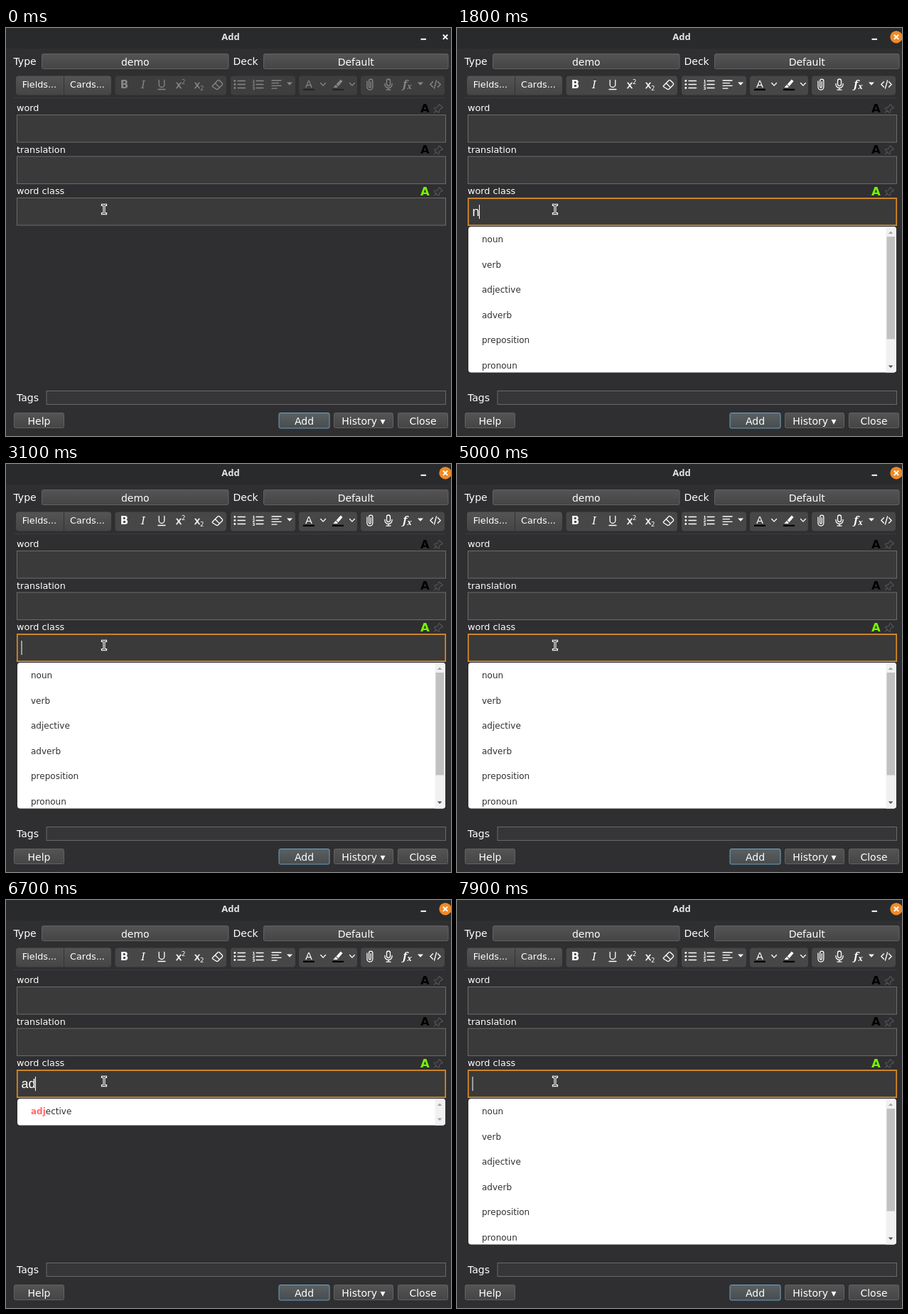
Write an HTML page that moves like this. It is 626x575 px and loops after 8000 ms.

```html
<!DOCTYPE html>
<html lang="en">
<head>
<meta charset="utf-8">
<title>Add</title>
<style>
  html, body { margin: 0; width: 100%; height: 100%; overflow: hidden; background: #2f2f31; }
  svg { display: block; width: 626px; height: 575px; font-family: "DejaVu Sans", sans-serif; }
  .ui { font-size: 14px; fill: #fff; }
  .label { font-size: 12.8px; fill: #fff; }
  .mid { text-anchor: middle; }
  .item { font-size: 12px; fill: #303030; }
  .hit { font-weight: bold; fill: #ff6b6b; }
  .typed { font: 18px "Liberation Sans", Arial, sans-serif; fill: #fff; }
  .badge { font: bold 16.5px "DejaVu Sans", sans-serif; text-anchor: middle; }
  .line { fill: none; stroke: #fff; stroke-width: 1.3; stroke-linecap: round; stroke-linejoin: round; }
  .solid { fill: #fff; }
</style>
</head>
<body>
<svg viewBox="0 0 626 575">
  <defs>
    <linearGradient id="btn" x2="0" y2="1">
      <stop stop-color="#545454"/><stop offset="1" stop-color="#454545"/>
    </linearGradient>
    <linearGradient id="blue" x2="0" y2="1">
      <stop stop-color="#5b6063"/><stop offset="1" stop-color="#474c4f"/>
    </linearGradient>
    <g id="pin" fill="none" stroke="#555557" stroke-width="1.1" stroke-linejoin="round">
      <path d="M609.5 -5.5l5 5-1.5.8-1-.2-2.6 2.6.2 2.6-1.2 1-6-6 1-1.2 2.6.2 2.6-2.6-.2-1zM605.2 3.3l-3.2 3.2"/>
    </g>
  </defs>

  <rect width="626" height="575" fill="#2f2f31"/>
  <rect width="626" height="29" fill="#292a2c"/>
  <text class="mid" x="316" y="17" font-family="Noto Sans, sans-serif" font-size="13" font-weight="700" fill="#e4e4e4">Add</text>
  <path d="M583.5 15.8h7.5" stroke="#fff" stroke-width="2"/>
  <circle id="close" cx="618" cy="12.7" r="8.7" fill="#ef8a26"/>
  <path d="M614.8 9.5l6.4 6.4m0-6.4l-6.4 6.4" stroke="#fff" stroke-width="1.9"/>

  <g id="form"></g>
  <path d="M11 98.5H618" stroke="#3c3c3e"/>

  <g id="chips"></g>
  <path d="M81.5 68v26" stroke="#343436"/>
  <text class="label mid" x="47" y="84">Fields...</text>
  <text class="label mid" x="114.5" y="84">Cards...</text>

  <g id="tools">
    <g class="solid mid">
      <text x="166.5" y="85" font-size="15" font-weight="700">B</text>
      <text x="193" y="85" font-family="DejaVu Serif, Noto Serif, serif" font-size="15" font-style="italic">I</text>
      <text x="243" y="85" font-size="14.5" stroke="#fff" stroke-width=".4">x</text>
      <text x="249.7" y="79" font-size="8.5">2</text>
      <text x="269" y="85" font-size="14.5" stroke="#fff" stroke-width=".4">x</text>
      <text x="275.7" y="88" font-size="8.5">2</text>
      <text x="426" y="83.5" font-size="14.5">A</text>
      <text x="564.5" y="84" font-family="Noto Serif, serif" font-size="15" font-style="italic" font-weight="700">f<tspan font-size="11" dy="2">x</tspan></text>
    </g>
    <g class="line">
      <path d="M215.2 73.5v6.2a3.8 3.8 0 0 0 7.6 0v-6.2M214 86.5h10"/>
      <path d="M290.5 81.5l7.3-7.5q1.3-1.2 2.6 0l3.7 3.7q1.2 1.3 0 2.6l-5.8 5.7q-1.4 1-2.8 0l-5-3.2q-.6-.6 0-1.3zM294.2 77.7l6.2 6.2"/>
      <path d="M326 74.5h10.5M326 79.5h10.5M326 84.5h10.5M352 74.5h10M352 79.5h10M352 84.5h10"/>
      <path d="M374 74h13M374 77.7h9.5M374 81.4h13M374 85.1h7"/>
      <path d="M442.7 77.5l3.4 3.6 3.4-3.6M483.5 77.5l3.4 3.6 3.4-3.6"/>
      <path d="M508 75v8.2a3.9 3.9 0 0 0 7.8 0v-8.5a2.6 2.6 0 0 0-5.2 0v8a1.3 1.3 0 0 0 2.6 0v-7"/>
      <rect x="535.5" y="72" width="5" height="9.5" rx="2.5"/>
      <path d="M533 78.5v1a5 5 0 0 0 10 0v-1M538 84.6v2.6m-3 0h6"/>
      <path d="M600.5 75.8l-3.7 3.7 3.7 3.7M607.5 75.8l3.7 3.7-3.7 3.7M605.6 73.8l-3.2 11.4"/>
    </g>
    <g class="solid">
      <circle cx="321.8" cy="74.5" r="1.4"/><circle cx="321.8" cy="79.5" r="1.4"/><circle cx="321.8" cy="84.5" r="1.4"/>
      <g font-size="5.6" font-weight="700"><text x="346.5" y="76.6">1</text><text x="346.5" y="81.6">2</text><text x="346.5" y="86.6">3</text></g>
      <path d="M395 76.5h8l-4 4.3zM579 76.5h8l-4 4.3z"/>
      <path d="M470.8 72.4l2.7 2.5-6 7.2-3-2.7zM463.8 80l3.2 2.9-1.6 1.1h-5z"/>
    </g>
    <path d="M418 86.8h16M459 86.8h16" stroke="#000" stroke-width="2.2"/>
  </g>

  <rect id="focus" x="15.8" y="240.1" width="602.4" height="38" fill="none" stroke="#dc8a22" stroke-width="1.7"/>
  <text id="typed" class="typed" x="21.5" y="265.3"></text>
  <rect id="caret" y="249" width="1" height="20" fill="#fff"/>

  <g id="popup">
    <rect id="sheet" x="16" y="280" width="602" rx="4" fill="#fff"/>
    <path id="track" fill="#f1f1f1"/>
    <rect id="thumb" x="604.5" y="294" width="11.5" height="144.5" fill="#c1c1c1"/>
    <path d="M606.8 290h6.6l-3.3-3.6z" fill="#a3a3a3"/>
    <path id="down" d="M606.8 -2h6.6l-3.3 3.6z"/>
    <g id="items"></g>
  </g>

  <g fill="none" stroke-linecap="square">
    <path id="beam" d="M135.5 249.3h1.4l1.1.8 1.1-.8h1.4M138 250.5v10M135.5 261.7h1.4l1.1-.8 1.1.8h1.4" stroke="#fff" stroke-width="3.2"/>
    <path d="M135.5 249.3h1.4l1.1.8 1.1-.8h1.4M138 250.5v10M135.5 261.7h1.4l1.1-.8 1.1.8h1.4" stroke="#222" stroke-width="1"/>
  </g>
</svg>

<script>
const $ = id => document.getElementById(id);
const show = (id, on) => $(id).setAttribute('visibility', on ? 'visible' : 'hidden');

const box = (x, y, w, h, fill, stroke, r = 0) =>
  `<rect x="${x}" y="${y}" width="${w}" height="${h}" rx="${r}" fill="${fill}" stroke="${stroke}"/>`;
const text = (cls, x, y, s, more = '') => `<text class="${cls}" x="${x}" y="${y}" ${more}>${s}</text>`;
const button = (x, y, w, h, s) =>
  box(x, y, w, h, 'url(#btn)', '#626264', 2) + text('ui mid', x + w / 2, y + 16, s);

// Static form
let form = text('ui', 10.5, 52, 'Type') + text('ui', 319.5, 52, 'Deck') + text('ui', 15, 526, 'Tags')
  + button(50.5, 36.5, 262.5, 21, 'demo') + button(362.5, 36.5, 259.5, 21, 'Default')
  + button(11.5, 542.5, 70, 21, 'Help') + button(461.5, 542.5, 83, 21, 'History ▾')
  + button(551.5, 542.5, 70, 21, 'Close')
  + box(384, 542.5, 71, 21.5, 'url(#blue)', '#6fa3c0', 2) + text('ui mid', 419.5, 558.5, 'Add')
  + box(57, 511.5, 561.5, 19, '#363638', '#69696b');
['word', 'translation', 'word class'].forEach((name, i) => {
  const y = 58.5 * i;
  form += text('label', 15, 117 + y, name)
    + text('badge', 589.3, 118.8 + y, 'A', `fill="${i === 2 ? '#76f500' : '#000'}"`)
    + `<use href="#pin" y="${113 + y}"/>`
    + box(15.5, 122.5 + y, 603, 38.5, '#3a3a3a', '#6c6c6c');
});
$('form').innerHTML = form;

// Toolbar chips: left edge and width
$('chips').innerHTML = [[14, 134], [153.5, 156.5], [316, 91], [412, 82], [499, 118]]
  .map(([x, w], i) => `<rect ${i ? 'class="chip"' : ''} x="${x}" y="67.5" width="${w}" height="27" rx="4" fill="${i ? '#474747' : 'url(#btn)'}"/>`)
  .join('');
const chips = document.querySelectorAll('.chip');

const words = ['noun', 'verb', 'adjective', 'adverb', 'preposition', 'pronoun'];

// time, typed text, caret on, list query (null = closed)
const steps = [
  [0, '', 0, null], [300, '', 1, null], [400, '', 1, ''], [1000, '', 0, ''], [1600, '', 1, ''],
  [1800, 'n', 1, ''], [1900, 'n', 1, 'n'], [2000, 'no', 1, 'no'], [2600, 'no', 0, 'no'],
  [2800, 'n', 0, 'n'], [3000, '', 0, 'n'], [3100, '', 1, ''], [3800, '', 0, ''],
  [4400, '', 1, ''], [5000, '', 0, ''], [5100, 'a', 1, 'a'], [5300, 'ad', 1, 'ad'],
  [5500, 'adj', 1, 'adj'], [6100, 'adj', 0, 'adj'], [6700, 'ad', 1, 'adj'], [6800, 'ad', 1, 'ad'],
  [7100, 'a', 1, 'a'], [7300, '', 0, 'a'], [7400, '', 0, ''], [7900, '', 1, '']
];
const LOOP = 8000;

function drawList(query) {
  show('popup', query !== null);
  show('thumb', query === '');
  if (query === null) return;
  const found = words.filter(w => w.startsWith(query));
  const h = query ? 2 + 35.5 * found.length : 205.5;
  $('sheet').setAttribute('height', h);
  $('track').setAttribute('d', `M603.5 280h10.5q4 0 4 4v${h - 8}q0 4-4 4h-10.5z`);
  $('down').setAttribute('transform', `translate(0 ${280 + h - 8})`);
  $('down').setAttribute('fill', query ? '#a3a3a3' : '#505050');
  $('items').innerHTML = found.map((w, i) => text('item', 35, 302 + 35.5 * i,
    `<tspan class="hit">${query}</tspan>${w.slice(query.length)}`)).join('');
}

function draw([time, typed, caret, query]) {
  const active = time >= 300;
  show('close', active);
  show('focus', active);
  $('tools').setAttribute('opacity', active ? 1 : 0.38);
  chips.forEach(c => c.setAttribute('opacity', active ? 1 : 0.62));
  $('typed').textContent = typed;
  const advance = [...typed].reduce((sum, c) => sum + (c === 'j' ? 4 : 10), 0);
  $('caret').setAttribute('x', typed ? 21 + advance : 21.5);
  show('caret', caret);
  drawList(query);
}

let start, last;
function tick(now) {
  start ??= now;
  const t = (now - start) % LOOP;
  const step = steps.findLast(s => s[0] <= t) || steps[0];
  if (step !== last) draw(last = step);
  requestAnimationFrame(tick);
}
draw(last = steps[0]);
requestAnimationFrame(tick);
</script>
</body>
</html>
```
